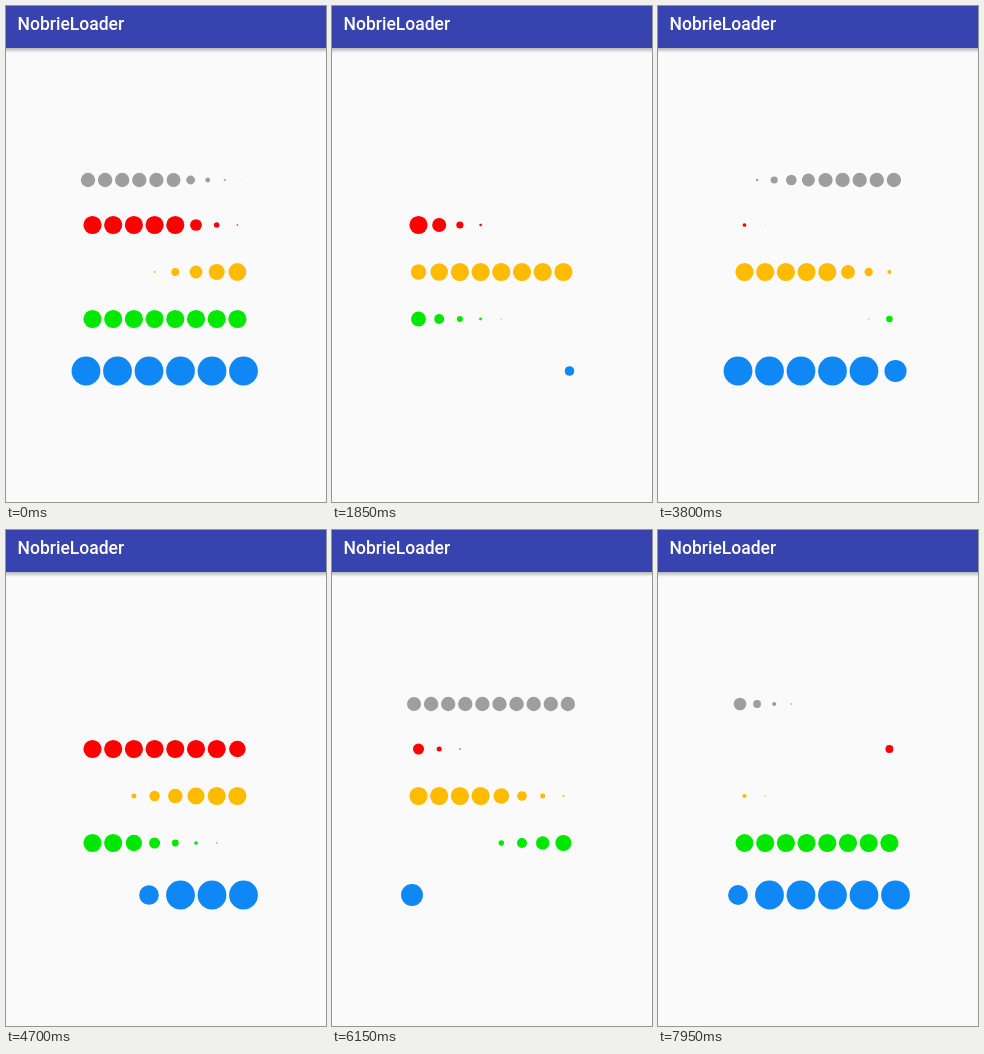
Write an HTML page without scripts that moves like this. It is 320x496 px and loops after 8000 ms.

```html
<!DOCTYPE html>
<html lang="en">
<head>
<meta charset="utf-8">
<title>Dot loaders</title>
<style>
@property --t { syntax: "<number>"; inherits: true; initial-value: 0; }
@property --k { syntax: "<integer>"; inherits: true; initial-value: 0; }
@property --p { syntax: "<number>"; inherits: true; initial-value: 0; }

html, body { margin: 0; width: 100%; height: 100%; overflow: hidden; background: #fafafa; }
svg { display: block; width: 320px; height: 496px; animation: clock 8s linear infinite; }
text { font: 500 17.5px Roboto, sans-serif; fill: #fff; }

/* elapsed milliseconds */
@keyframes clock { from { --t: 0; } to { --t: 8000; } }

/* --half: one wave, --from: start within the cycle,
   --dur: time per dot, --lag: delay between dots */
.row {
  --k: calc((var(--t) + var(--from)) / (2 * var(--half)) - 0.5); /* rounds to whole cycles */
  --p: calc(var(--t) + var(--from) - var(--k) * 2 * var(--half));
}
.gray   { --x: 82;   --gap: 17.1; --r: 7.2;  --dur: 500; --lag: 100; --half: 1412; --from: 990;  fill: #9e9e9e; }
.red    { --x: 86.5; --gap: 20.7; --r: 9.1;  --dur: 400; --lag: 100; --half: 1110; --from: 820;  fill: #f00; }
.yellow { --x: 86.5; --gap: 20.7; --r: 9.1;  --dur: 500; --lag: 100; --half: 1212; --from: 1984; fill: #fb0; }
.green  { --x: 86.5; --gap: 20.7; --r: 9.1;  --dur: 600; --lag: 100; --half: 1313; --from: 1318; fill: #00e800; }
.blue   { --x: 80;   --gap: 31.5; --r: 14.4; --dur: 400; --lag: 300; --half: 1926; --from: 1902; fill: #0f87f5; }

/* each dot grows, then shrinks, both accelerating */
circle {
  --i: 0;
  --age: (var(--p) - var(--i) * var(--lag));
  --grow: clamp(0, var(--age) / var(--dur), 1);
  --shrink: clamp(0, (var(--age) - var(--half)) / var(--dur), 1);
  cx: calc((var(--x) + var(--i) * var(--gap)) * 1px);
  r: calc(var(--r) * 1px * (var(--grow) * var(--grow) - var(--shrink) * var(--shrink)));
}
circle:nth-child(2) { --i: 1; }
circle:nth-child(3) { --i: 2; }
circle:nth-child(4) { --i: 3; }
circle:nth-child(5) { --i: 4; }
circle:nth-child(6) { --i: 5; }
circle:nth-child(7) { --i: 6; }
circle:nth-child(8) { --i: 7; }
circle:nth-child(9) { --i: 8; }
circle:nth-child(10) { --i: 9; }
</style>
</head>
<body>
<svg viewBox="0 0 320 496">
  <defs>
    <linearGradient id="shade" x2="0" y2="1">
      <stop stop-color="#000" stop-opacity=".27"/>
      <stop offset="1" stop-color="#000" stop-opacity="0"/>
    </linearGradient>
  </defs>
  <rect width="320" height="496" fill="#fafafa"/>
  <rect y="42" width="320" height="5" fill="url(#shade)"/>
  <rect width="320" height="42" fill="#3743af"/>
  <text x="11.5" y="24">NobrieLoader</text>

  <g class="row gray" transform="translate(0 174)">
    <circle/><circle/><circle/><circle/><circle/><circle/><circle/><circle/><circle/><circle/>
  </g>
  <g class="row red" transform="translate(0 219)">
    <circle/><circle/><circle/><circle/><circle/><circle/><circle/><circle/>
  </g>
  <g class="row yellow" transform="translate(0 266)">
    <circle/><circle/><circle/><circle/><circle/><circle/><circle/><circle/>
  </g>
  <g class="row green" transform="translate(0 313)">
    <circle/><circle/><circle/><circle/><circle/><circle/><circle/><circle/>
  </g>
  <g class="row blue" transform="translate(0 365)">
    <circle/><circle/><circle/><circle/><circle/><circle/>
  </g>
</svg>
</body>
</html>
```
